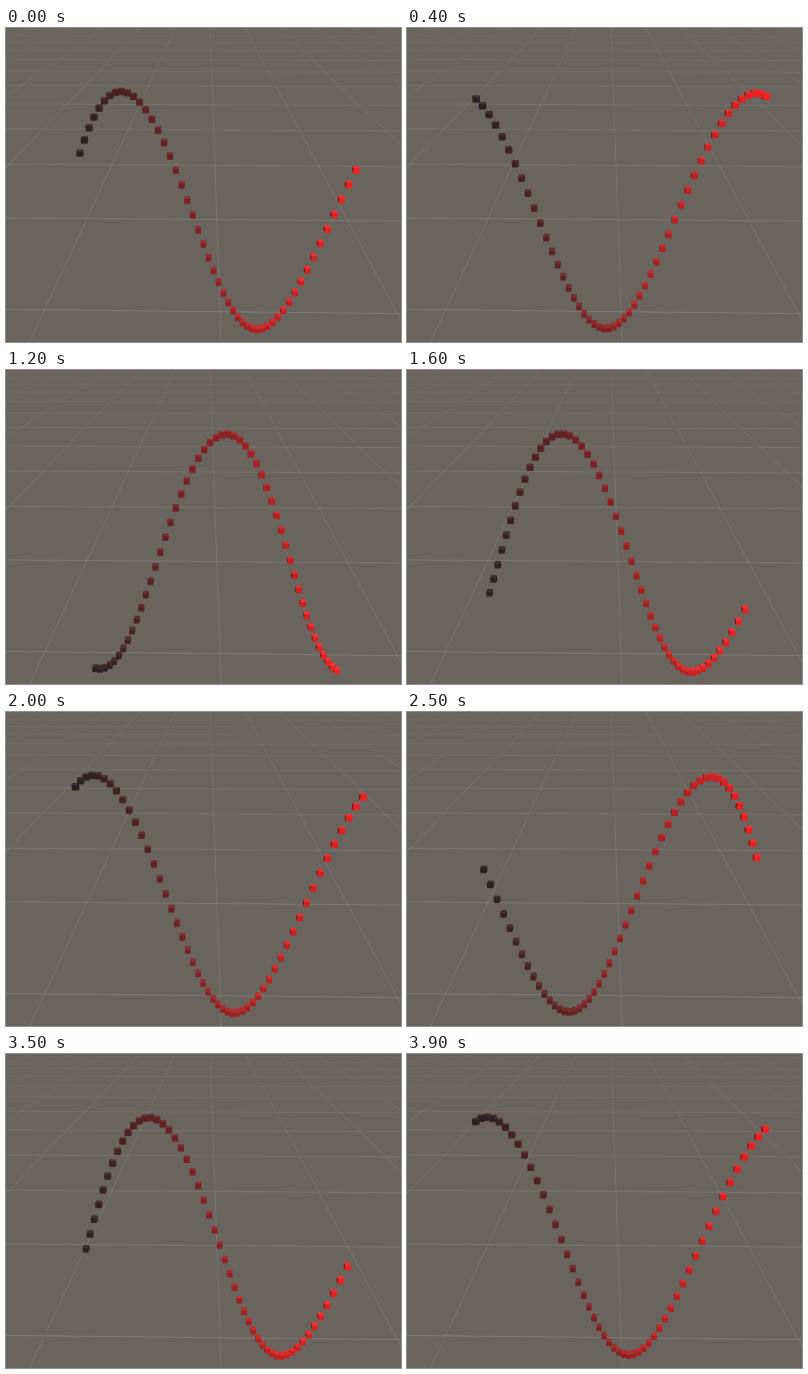
Animation of 395 by 314 pixels, one loop 4000 ms. Source, as a matplotlib script:

```python
import numpy as np
import matplotlib.pyplot as plt
from matplotlib.animation import FuncAnimation
from matplotlib.collections import LineCollection, PolyCollection

W, H = 395, 314
FRAMES, INTERVAL = 40, 100
COUNT = 50
STEP = 2 / COUNT
HALF = 1.06 * STEP / 2
DEPTH = 0.005                       # half cube depth over camera distance
VANISH = np.array([201.7, -70])     # where the depth lines meet
BACKGROUND = (106 / 255, 100 / 255, 94 / 255)

# Wave phase, sampled unevenly because the playback speed wavers
KEY_FRAMES = [0, 9, 16, 20, 25, 31, 39]
KEY_PHASES = [1.163, 2.116, 2.893, 3.35, 3.887, 4.545, 5.40]


def homography(src, dst):
    rows, rhs = [], []
    for (x, y), (u, v) in zip(src, dst):
        rows.append([x, y, 1, 0, 0, 0, -u * x, -u * y])
        rows.append([0, 0, 0, x, y, 1, -v * x, -v * y])
        rhs += [u, v]
    return np.append(np.linalg.solve(rows, rhs), 1).reshape(3, 3)


EDGE = 1 - STEP / 2
VIEW = homography(
    [(-EDGE, 1), (EDGE, 1), (-EDGE, -1), (EDGE, -1)],
    [(68.4, 63.1), (359.4, 65.2), (89.4, 298.7), (330.2, 302.6)])


def project(x, y, depth):
    u, v, w = VIEW @ (x, y, 1)
    return VANISH + (np.array([u, v]) / w - VANISH) * (1 + depth)


def shade(s, light, ambient=0.0):
    rgb = np.array([40 + 215 * s, 35, 36]) * light + ambient
    return np.clip(rgb / 255, 0, 1)


def cube(x, y):
    """Visible faces (side, top, front) and their colours."""
    s = (x + 1) / 2
    l, r, b, t = x - HALF, x + HALF, y - HALF, y + HALF
    near, far = DEPTH, -DEPTH
    on_left = project(x, y, 0)[0] < VANISH[0]
    e = r if on_left else l
    faces = [
        [(e, b, near), (e, t, near), (e, t, far), (e, b, far)],
        [(l, t, near), (r, t, near), (r, t, far), (l, t, far)],
        [(l, b, near), (r, b, near), (r, t, near), (l, t, near)],
    ]
    polys = [[project(*p) for p in face] for face in faces]
    colors = [shade(s, 0.8 if on_left else 0.55),
              shade(s, 1.08, 6),
              shade(s, 0.95)]
    return polys, colors


def floor_grid():
    lines, alphas = [], []
    for n in range(12):
        y = 1004 / (n + 2.84) + VANISH[1]
        tilt = 2.1 * (y - VANISH[1]) / 353
        lines.append([(0, y - tilt), (W, y + tilt)])
        alphas.append(0.36 * 0.87 ** n)
    for n in range(-9, 10):
        slope = 0.035 + 0.4985 * n
        bottom = H - VANISH[1]
        points = [VANISH + d * np.array([slope, 1])
                  for d in (-VANISH[1], 120, 180, bottom)]
        for k, (a, c) in enumerate(zip(points, points[1:])):
            lines.append([a, c])
            alphas.append((0.15, 0.22, 0.28)[k] * 0.88 ** abs(n))
    return lines, [(0.6, 0.64, 0.63, a) for a in alphas]


fig = plt.figure(figsize=(W / 100, H / 100), dpi=100, facecolor=BACKGROUND)
ax = fig.add_axes([0, 0, 1, 1])
ax.set_xlim(0, W)
ax.set_ylim(H, 0)
ax.axis("off")

grid_lines, grid_colors = floor_grid()
ax.add_collection(LineCollection(grid_lines, colors=grid_colors,
                                 linewidths=0.72, capstyle="butt"),
                  autolim=False)
cubes = PolyCollection([], linewidths=0, zorder=3)
ax.add_collection(cubes, autolim=False)

# Outer cubes first, so inner ones cover their hidden sides
XS = sorted((np.arange(COUNT) + 0.5) * STEP - 1, key=lambda x: -abs(x))


def update(frame):
    phase = np.interp(frame, KEY_FRAMES, KEY_PHASES)
    polys, colors = [], []
    for x in XS:
        p, c = cube(x, np.sin(np.pi * (x + phase)))
        polys += p
        colors += c
    cubes.set_verts(polys)
    cubes.set_facecolor(colors)
    return [cubes]


anim = FuncAnimation(fig, update, frames=FRAMES, interval=INTERVAL,
                     repeat=True, repeat_delay=0)
plt.show()
```
